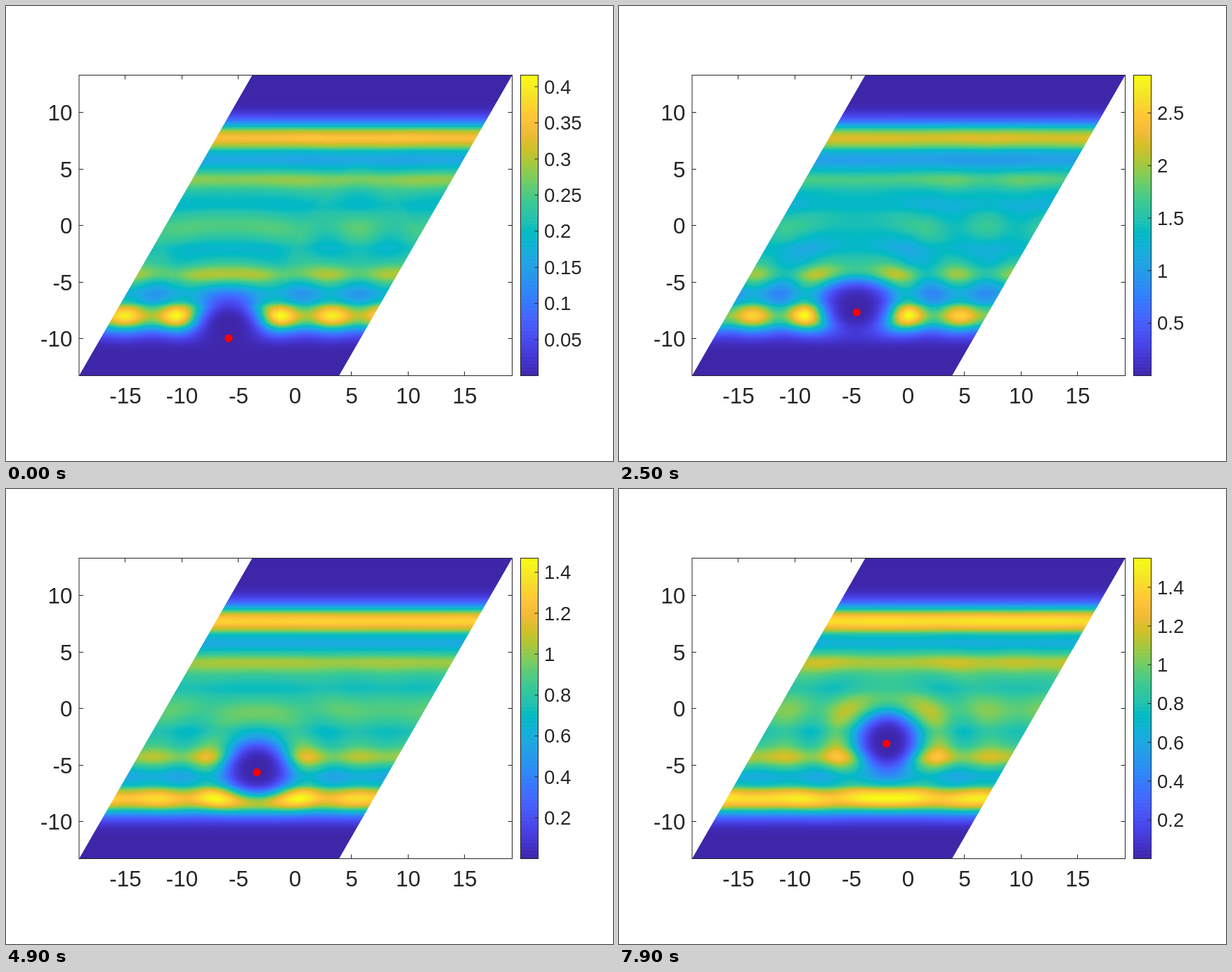
These frames come from a looping animation (864 by 648 pixels, 8 s). An HTML page with a canvas:

```html
<!DOCTYPE html>
<html lang="en">
<head>
<meta charset="utf-8">
<title>Density map</title>
<style>
  html, body { margin: 0; width: 100%; height: 100%; overflow: hidden; background: #fff; }
  canvas { display: block; }
</style>
</head>
<body>
<canvas id="stage" width="864" height="648"></canvas>
<script>
const LOOP = 8000, HOLD = 300, FIRST = 100;
const UNIT = 16.1, X0 = 411.5, Y0 = 313;
const BOX = { x: 104, y: 98.5, w: 616.5, h: 428 };
const BAR = { x: 732.5, w: 25 };
const PERIOD = 370, RING = 75, WAVE = 76;
const INK = '#262626', FONT = '"Liberation Sans", Arial, sans-serif';

const ctx = document.getElementById('stage').getContext('2d');

// Monotone cubic interpolation through (xs, ys), constant outside.
function spline(xs, ys) {
  const last = xs.length - 1;
  const d = i => (ys[i + 1] - ys[i]) / (xs[i + 1] - xs[i]);
  const m = xs.map((_, i) => {
    if (i === 0) return 0;
    if (i === last) return d(last - 1);
    const a = d(i - 1), b = d(i);
    return a * b <= 0 ? 0 : 2 * a * b / (a + b);
  });
  return x => {
    if (x <= xs[0]) return ys[0];
    if (x >= xs[last]) return ys[last];
    let i = 0;
    while (x > xs[i + 1]) i++;
    const h = xs[i + 1] - xs[i], u = (x - xs[i]) / h, v = 1 - u;
    return v * v * ((1 + 2 * u) * ys[i] + u * h * m[i]) +
           u * u * ((3 - 2 * u) * ys[i + 1] - v * h * m[i + 1]);
  };
}

// Undisturbed density against distance from the middle line.
const profile = spline(
  [0, 1, 1.9, 3, 4.18, 5.1, 5.9, 6.6, 7.15, 7.85, 8.4, 9, 9.5, 10, 10.6, 11.2],
  [.69, .64, .565, .63, .79, .59, .45, .54, .82, 1, .87, .5, .24, .1, .02, 0]);

// Slowly varying quantities, keyed by step.
const steps = [0, 4, 9, 15, 19, 23, 27];
const key = (...values) => spline(steps, values);
const holeX = key(317, 326, 338, 353, 362, 373, 382);
const holeY = key(455, 450, 432, 408, 387, 378, 361);
const radX = key(45, 46, 43, 40, 43, 38, 38);
const radY = key(40, 40, 38, 38, 37, 37, 40);
const ringAmp = key(.16, .2, .27, .12, .18, .18, .18);
const ringFade = key(130, 80, 85, 50, 50, 50, 50);
const peak = key(.416, 1.98, 2.86, 1.257, 1.757, 1.972, 1.55);

const palette = ('3e26a8 4332cb 4741e5 4852f4 4563fd 3875fe 2e87f7 2797eb 20a5e3 12b1d6 02bac3 ' +
  '24c1ae 37c897 57cc7a 81cc59 abc739 d1bf27 f0ba36 fec338 fad62d f5e924 f9fb15')
  .split(' ').map(c => [0, 2, 4].map(i => parseInt(c.substr(i, 2), 16)));

const lut = Array.from({ length: 256 }, (_, i) => {
  const p = i / 255 * (palette.length - 1), k = Math.min(Math.floor(p), palette.length - 2);
  return palette[k].map((c, j) => Math.round(c + (palette[k + 1][j] - c) * (p - k)));
});

const W = 618, H = 430, LEFT = 103, TOP = 98;
const map = document.createElement('canvas');
map.width = W;
map.height = H;
const mapCtx = map.getContext('2d');
const pixels = mapCtx.createImageData(W, H);
const field = new Float32Array(W * H);
const slant = BOX.w - PERIOD;

function rowStart(y) {
  return BOX.x + slant * (1 - (y - BOX.y) / BOX.h);
}

function paintMap(n) {
  const cx = holeX(n), cy = holeY(n), rx = radX(n), ry = radY(n);
  const amp = ringAmp(n), fade = ringFade(n);
  let max = 0;
  field.fill(0);
  for (let j = 0; j < H; j++) {
    const y = TOP + j + .5, dy = y - cy, start = rowStart(y);
    const base = profile(Math.abs((Y0 - y) / UNIT + .1));
    const from = Math.max(0, Math.floor(start - LEFT) - 1);
    const to = Math.min(W, Math.ceil(start + PERIOD - LEFT) + 1);
    for (let i = from; i < to; i++) {
      let hole = 1, wave = 0;
      for (let k = -1; k <= 1; k++) {
        const dx = LEFT + i + .5 - cx + k * PERIOD;
        const r2 = dx * dx + dy * dy, r = Math.sqrt(r2);
        if (r > 300) continue;
        const q = (dx / rx) ** 2 + (dy / ry) ** 2;
        if (q < 9) hole *= 1 - Math.exp(-Math.LN2 * q * q);
        const along = .45 + .55 * dx * dx / (r2 + 1);
        wave += amp * along * Math.exp(-Math.max(0, r - RING) / fade) *
                Math.cos(2 * Math.PI * (r - RING) / WAVE);
      }
      const v = base * hole * (1 + wave);
      field[j * W + i] = v;
      if (v > max) max = v;
    }
  }
  for (let p = 0; p < field.length; p++) {
    const c = lut[Math.round(field[p] / max * 255)], o = p * 4;
    pixels.data[o] = c[0];
    pixels.data[o + 1] = c[1];
    pixels.data[o + 2] = c[2];
    pixels.data[o + 3] = 255;
  }
  mapCtx.putImageData(pixels, 0, 0);
}

function line(x1, y1, x2, y2) {
  ctx.beginPath();
  ctx.moveTo(x1, y1);
  ctx.lineTo(x2, y2);
  ctx.stroke();
}

function label(text, x, y, size, align) {
  ctx.font = size + 'px ' + FONT;
  ctx.textAlign = align;
  ctx.fillStyle = INK;
  ctx.fillText(text, x, y + size * .355);
}

function drawAxes() {
  const right = BOX.x + BOX.w, bottom = BOX.y + BOX.h;
  for (let v = -15; v <= 15; v += 5) {
    const x = Math.round(X0 + v * UNIT) - .5;
    line(x, bottom, x, bottom - 6);
    line(x, BOX.y, x, BOX.y + 6);
    label(v, X0 + v * UNIT, 555, 31.5, 'center');
    if (Math.abs(v) > 10) continue;
    const y = Math.round(Y0 - v * UNIT) - .5;
    line(BOX.x, y, BOX.x + 6, y);
    line(right, y, right - 6, y);
    label(v, 94.5, Y0 - v * UNIT, 31.5, 'right');
  }
}

function drawMap() {
  const bottom = BOX.y + BOX.h;
  ctx.save();
  ctx.beginPath();
  ctx.moveTo(BOX.x + slant, BOX.y);
  ctx.lineTo(BOX.x + BOX.w, BOX.y);
  ctx.lineTo(BOX.x + PERIOD, bottom);
  ctx.lineTo(BOX.x, bottom);
  ctx.clip();
  ctx.drawImage(map, LEFT, TOP);
  ctx.restore();
}

function drawBar(max) {
  const bottom = BOX.y + BOX.h, cell = BOX.h / 256;
  lut.forEach((c, i) => {
    const y = bottom - (i + 1) * cell;
    ctx.fillStyle = `rgb(${c})`;
    ctx.fillRect(BAR.x, y, BAR.w, Math.min(cell + .6, bottom - y));
  });
  ctx.strokeRect(BAR.x, BOX.y, BAR.w, BOX.h);
  const gap = max < .5 ? .05 : max < 1 ? .1 : max < 1.9 ? .2 : .5;
  for (let i = 1; i * gap <= max; i++) {
    const y = bottom - BOX.h * i * gap / max;
    line(BAR.x + BAR.w - 5, y, BAR.x + BAR.w, y);
    label(+(i * gap).toFixed(2), 766, y, 27.5, 'left');
  }
}

function draw(n) {
  ctx.fillStyle = '#fff';
  ctx.fillRect(0, 0, 864, 648);
  ctx.strokeStyle = INK;
  ctx.lineWidth = 1;
  drawAxes();
  paintMap(n);
  drawMap();
  ctx.strokeRect(BOX.x, BOX.y, BOX.w, BOX.h);
  drawBar(peak(n));
  ctx.fillStyle = '#f00';
  ctx.beginPath();
  ctx.arc(317 + 2.36 * n, 473.2 - 4.1 * n, 5.6, 0, 2 * Math.PI);
  ctx.fill();
}

let shown = -1;
function tick() {
  const t = performance.now() % LOOP;
  const n = t < FIRST ? 0 : Math.floor((t - FIRST) / HOLD) + 1;
  if (n !== shown) draw(shown = n);
  requestAnimationFrame(tick);
}
tick();
</script>
</body>
</html>
```
